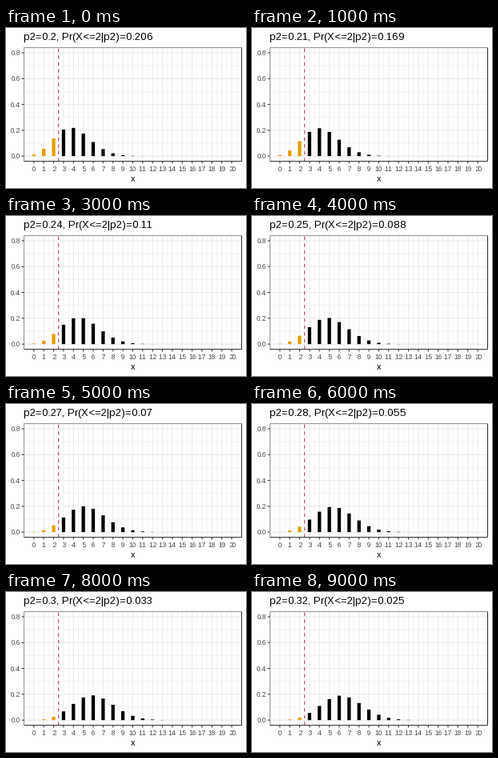
A matplotlib script for the animation above (10000 ms loop, 300 by 200 pixels).

```python
import math
import matplotlib.pyplot as plt
from matplotlib.animation import FuncAnimation
from matplotlib.patches import Rectangle

plt.rcParams.update({
    "font.family": "Liberation Sans",
    "text.hinting": "force_autohint",
    "text.hinting_factor": 1,
    "path.snap": False,
})

W, H, DPI = 300, 200, 100
LEFT, RIGHT, TOP, BOTTOM = 22.45, 294.5, 24.5, 166.6
N, CUT = 20, 2
P_START, P_STEP, FRAMES = 0.2, 0.013, 10
LINE, BAR_W, TICK = 1.067, 4.27, 2.75
GRID, DARK, LABEL = "#ebebeb", "#333333", "#4d4d4d"


def px(n):
    """Pixels to points."""
    return n * 72 / DPI


def sx(x):
    return LEFT + (x + 1) / (N + 2) * (RIGHT - LEFT)


def sy(y):
    return BOTTOM - (y + 0.04) / 0.88 * (BOTTOM - TOP)


fig = plt.figure(figsize=(W / DPI, H / DPI), dpi=DPI, facecolor="white")
ax = fig.add_axes([0, 0, 1, 1])
ax.set_xlim(0, W)
ax.set_ylim(H, 0)
ax.axis("off")


def line(x0, y0, x1, y1, color, width=LINE, z=1, style="-"):
    ax.plot([x0, x1], [y0, y1], color=color, lw=px(width), ls=style,
            zorder=z, solid_capstyle="butt", dash_capstyle="butt")


def text(x, y, s, size, color="black", ha="left"):
    return ax.text(x, y, s, fontsize=px(size), color=color, ha=ha,
                   va="baseline")


# Minor grid, then major grid with ticks and labels
for i in range(-1, N + 1):
    line(sx(i + 0.5), TOP, sx(i + 0.5), BOTTOM, GRID, LINE / 2)
for i in range(4):
    y = sy(0.1 + 0.2 * i)
    line(LEFT, y, RIGHT, y, GRID, LINE / 2)
for i in range(5):
    y = sy(0.2 * i)
    line(LEFT, y, RIGHT, y, GRID)
    line(LEFT - TICK, y, LEFT, y, DARK)
    text(LEFT - 4.95, round(y) + 3, f"{0.2 * i:.1f}", 9, LABEL, "right")
for i in range(N + 1):
    x = sx(i)
    line(x, TOP, x, BOTTOM, GRID)
    line(x, BOTTOM, x, BOTTOM + TICK, DARK)
    text(x, 179, str(i), 9, LABEL, "center")

bars = []
for i in range(N + 1):
    color = "#e69f00" if i <= CUT else "black"
    bar = Rectangle((sx(i) - BAR_W / 2, sy(0)), BAR_W, 0, fc=color, lw=0,
                    zorder=3)
    bars.append(ax.add_patch(bar))

line(sx(CUT + 0.5), BOTTOM, sx(CUT + 0.5), TOP, "#b03a48", z=4,
     style=(0, (4, 4)))

# Panel border: the left and top strokes show only their inner half
half = LINE / 2
line(LEFT + half / 2, TOP, LEFT + half / 2, BOTTOM, DARK, half, 5)
line(LEFT, TOP + half / 2, RIGHT, TOP + half / 2, DARK, half, 5)
line(RIGHT, TOP, RIGHT, BOTTOM, DARK, z=5)
line(LEFT, BOTTOM, RIGHT, BOTTOM, DARK, z=5)

text((LEFT + RIGHT) / 2, 192, "x", 11, ha="center")
title = text(LEFT, 15, "", 13)


def binom(k, p):
    return math.comb(N, k) * p**k * (1 - p)**(N - k)


def short(value, digits):
    return f"{round(value + 1e-9, digits):g}"


def update(frame):
    p = P_START + P_STEP * frame
    probs = [binom(k, p) for k in range(N + 1)]
    for bar, prob in zip(bars, probs):
        bar.set_height(sy(prob) - sy(0))
    tail = sum(probs[:CUT + 1])
    title.set_text(f"p2={short(p, 2)}, Pr(X<={CUT}|p2)={short(tail, 3)}")
    return [*bars, title]


anim = FuncAnimation(fig, update, frames=FRAMES, interval=1000,
                     init_func=lambda: update(0), repeat=True,
                     repeat_delay=0, blit=False)
plt.show()
```
